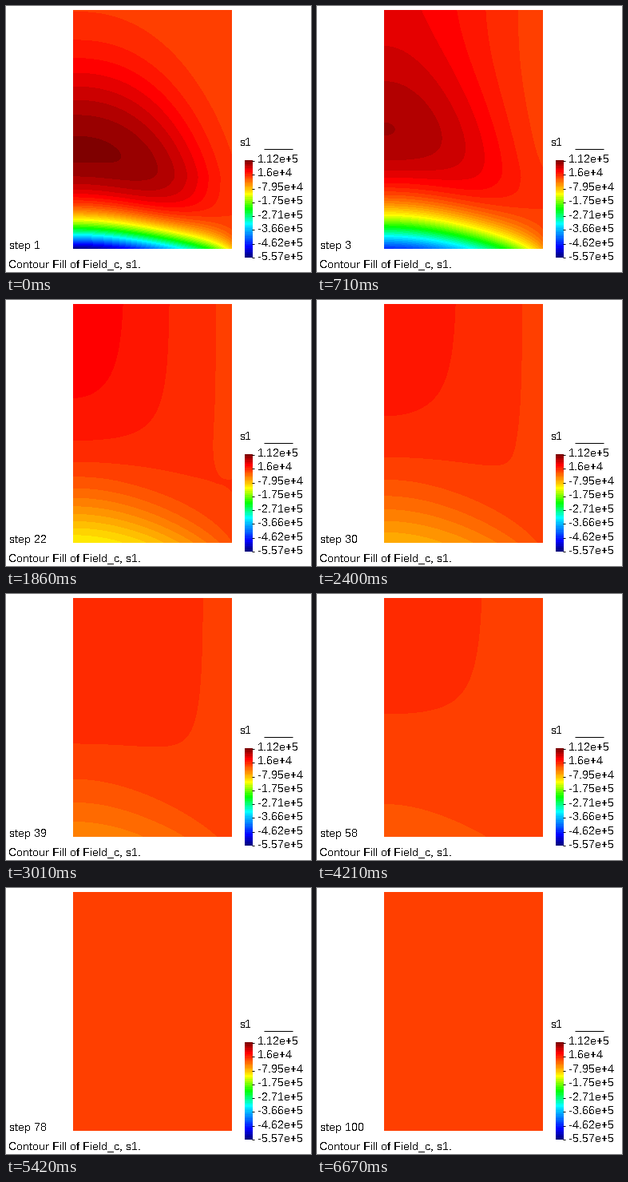
Animation, 382 px wide and 333 px high, one loop 7.13 s. Source, as a matplotlib script:

```python
import numpy as np
import matplotlib.pyplot as plt
from matplotlib.animation import FuncAnimation
from matplotlib.colors import LinearSegmentedColormap

W, H, DPI = 382, 333, 100
LOOP, INTERVAL = 7130, 23
HOLD, TICK, CHANGES = 580, 6090 / 91, 92
LEFT, TOP, RIGHT, BOTTOM = 84, 5, 283, 304
BANDS = 50

px, py = np.meshgrid(np.arange(LEFT, RIGHT) + 0.5, np.arange(TOP, BOTTOM) + 0.5)
X = (px - LEFT) / (RIGHT - LEFT)
RISE = BOTTOM - py
RAMP = np.clip((py - 230) / 74, 0, 1)

# Rounded dome at first, later a cosine profile over the full height
lift = np.maximum(215 - py, 0) / 140
DOME = np.exp(-(((1.4 * X**1.8) ** 1.3 + lift**1.3) ** 1.85))
SPREAD = (0.866 + np.cos(2.618 * X)) / 1.866
ARCH = np.cos(1.47 * X)
SIDE = X**6 * np.exp(-(((py - 235) / 40) ** 2))


def decay(amount, step, scale):
    return amount * np.exp(-step / scale)


def field_at(step):
    """Stress in colour bands: a fading crown above a fading dip at the base."""
    early = np.exp((1 - step) / 3)
    edge = 41.8 - decay(0.5, step, 8)
    crown = 1.866 * (decay(4.25, step, 20.5) + decay(0.68, step, 5))
    depth = decay(31, step, 20.5) + decay(23, step, 6.5)
    reach = 62 + 0.5 * step - decay(33, step, 5)
    power = 2.4 - (1.25 + decay(0.4, step, 5)) * RAMP

    top = edge + crown * (early * DOME + (1 - early) * SPREAD)
    dip = depth * np.exp(-((RISE / reach) ** 1.25)) * ARCH**power
    return top - dip + (1 - early) * decay(0.9, step, 18) * SIDE


def step_at(t):
    """Step number at time t; a few steps are skipped, more towards the end."""
    k = int(np.clip((t - HOLD) // TICK + 1, 0, CHANGES))
    skipped = min(0.06 * k, 0.6) + 6.4 * (k / CHANGES) ** 2.5
    return 1 + k + round(skipped)


stops = np.array([0, 5, 17, 24.5, 32, 44, 49]) / 49
colors = [(0, 0, 0.5), "blue", "cyan", "lime", "yellow", "red", (0.5, 0, 0)]
cmap = LinearSegmentedColormap.from_list("fill", list(zip(stops, colors)), N=BANDS)
style = dict(cmap=cmap, aspect="auto", interpolation="nearest", vmin=0, vmax=BANDS)

plt.rcParams.update({
    "font.family": "Liberation Sans",
    "font.size": 14 * 72 / DPI,
    "text.antialiased": False,
    "text.hinting": "native",
    "text.hinting_factor": 1,
})
fig = plt.figure(figsize=(W / 100, H / 100), dpi=DPI, facecolor="white")
ax = fig.add_axes([0, 0, 1, 1])


def label(x, y, text):
    return ax.text(x, y, text, color="black", va="baseline")


def rule(x0, x1, y):
    ax.plot([x0, x1], [y, y], color="black", lw=72 / DPI, solid_capstyle="butt")


body = ax.imshow(field_at(1), extent=(LEFT, RIGHT, BOTTOM, TOP), **style)
ax.imshow(np.arange(BANDS)[::-1, None] + 0.5, extent=(299, 309, 315, 193), **style)

label(293, 175, "s1")
rule(323, 359, 178.5)
values = "1.12e+5 1.6e+4 -7.95e+4 -1.75e+5 -2.71e+5 -3.66e+5 -4.62e+5 -5.57e+5"
for i, value in enumerate(values.split()):
    label(315, round(196 + i * 122 / 7), value)
    rule(308, 311, round(193 + i * 121 / 7) + 0.5)

counter = label(4, 304, "step 1")
label(3, 327, "Contour Fill of Field_c, s1.")

ax.set_xlim(0, W)
ax.set_ylim(H, 0)
ax.axis("off")


def update(i):
    step = step_at(i * INTERVAL + 15)
    body.set_data(field_at(step))
    counter.set_text(f"step {step}")
    return body, counter


anim = FuncAnimation(fig, update, frames=LOOP // INTERVAL, interval=INTERVAL,
                     repeat=True, repeat_delay=0, blit=False)
plt.show()
```
